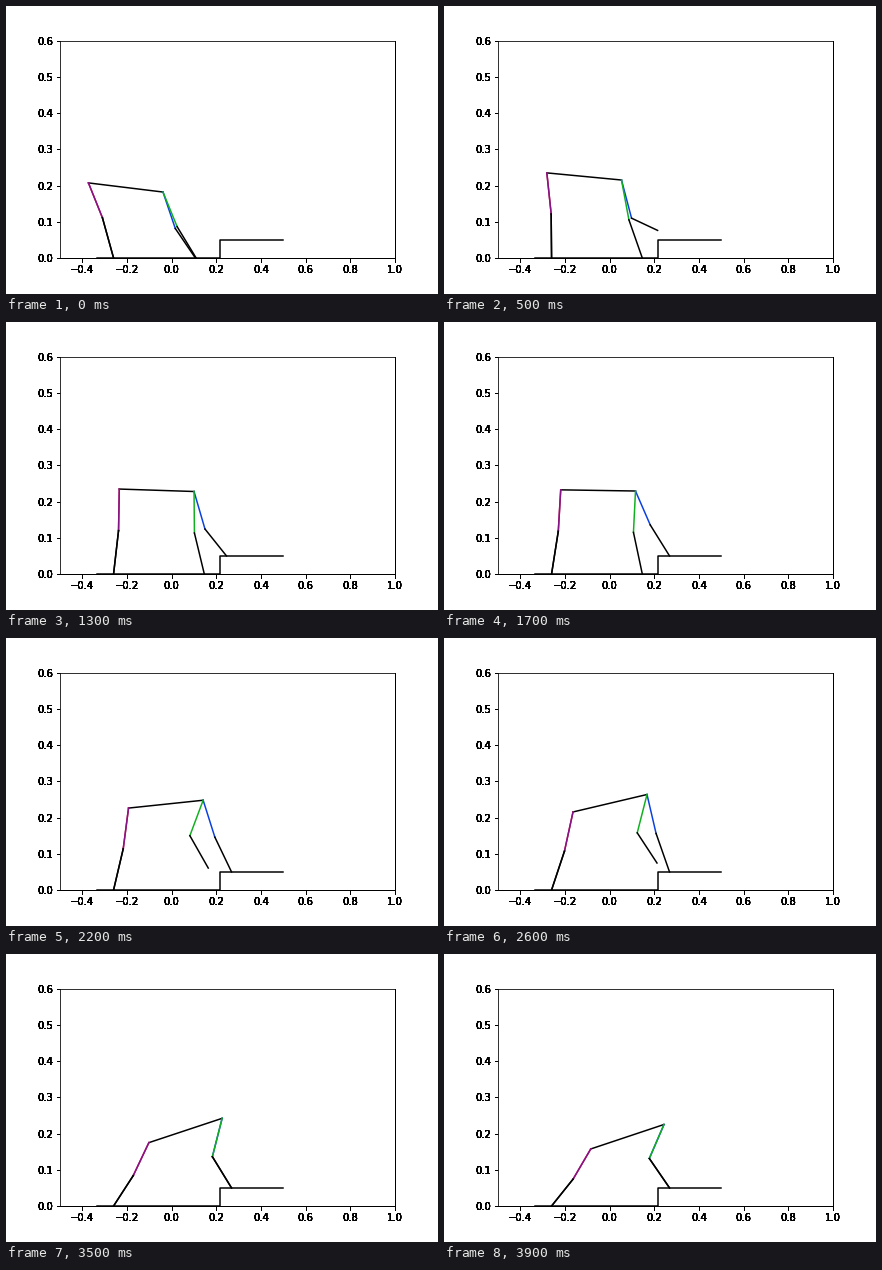
Write a matplotlib script that moves like this. It is 432 px wide and 288 px high and loops after 4 s.

```python
import numpy as np
import matplotlib.pyplot as plt
from matplotlib.animation import FuncAnimation

FRAMES, STEP_MS = 40, 100
BODY, REACH = 0.335, 0.2358
THIGH, SHIN = 0.1145, 0.1215
STEP_X, STEP_Y, LIFT = 0.2168, 0.05, 0.0486
HIND_FOOT = np.array([-0.26, 0.0])

# Front hip way-points: time, x, y
HIP_KEYS = np.array([
    (0, -.0385, .182), (.5, .0533, .2152), (.9, .0824, .2263),
    (1.7, .116, .229), (2.6, .1676, .2635), (2.8, .184, .2685),
    (3.1, .2056, .258), (3.9, .2437, .2249)])


def spline(t, keys):
    """Cubic Hermite curve with slopes taken from the neighbours."""
    times, pts = keys[:, 0], keys[:, 1:]
    slopes = np.gradient(pts, times, axis=0)
    i = min(np.searchsorted(times, t, side="right") - 1, len(times) - 2)
    h = times[i + 1] - times[i]
    u = (t - times[i]) / h
    ease = u * u * (3 - 2 * u)
    return (pts[i] + ease * (pts[i + 1] - pts[i])
            + h * u * (1 - u) * ((1 - u) * slopes[i] - u * slopes[i + 1]))


def progress(t, start, end):
    return np.clip((t - start) / (end - start), 0, 1)


def slide(t, start, end):
    u = progress(t, start, end)
    return u * u * (3 - 2 * u)


def ease_out(u):
    return np.sin(np.pi / 2 * u)


def ease_in(u):
    return 1 - np.cos(np.pi / 2 * u)


def swing(u, x0, x1, ease):
    """Foot arc from the floor up onto the step."""
    return np.array([x0 + (x1 - x0) * ease(u),
                     STEP_Y * u + LIFT * np.sin(np.pi * u)])


def blue_foot(t):
    foot = swing(progress(t, 0, 0.85), 0.1065, 0.2425, ease_out)
    return foot + [0.0259 * slide(t, 1.2, 1.65), 0]


def green_foot(t):
    x0 = 0.110 + 0.0365 * slide(t, 0, 0.4)
    return swing(progress(t, 1.8, 2.95), x0, 0.2684, ease_in)


def joint(p, q, a, b, side):
    """Point at distance a from p and b from q, on the chosen side."""
    dist = np.hypot(*(q - p))
    scale = max(1, 1.003 * dist / (a + b))
    a, b = a * scale, b * scale
    along = (a * a - b * b + dist * dist) / (2 * dist)
    bend = side * np.sqrt(max(a * a - along * along, 0))
    ux, uy = (q - p) / dist
    return p + along * np.array([ux, uy]) + bend * np.array([-uy, ux])


fig = plt.figure(figsize=(6, 4), dpi=72, facecolor="white")

# Stacked opaque axes give the labels their heavy look
for _ in range(10):
    ax = fig.add_axes([0.125, 0.125, 0.775, 0.755])
    ax.set(xlim=(-0.5, 1), ylim=(0, 0.6))
    ax.tick_params(labelsize=10)

ax.plot([-0.335, STEP_X, STEP_X, 0.5], [0, 0, STEP_Y, STEP_Y], "k", lw=1.5)


def segment(color):
    return ax.plot([], [], color=color, lw=1.5)[0]


body = segment("black")
legs = [(segment(c), segment("black"))
        for c in ("#c81048", "#861486", "#0a40e0", "#10b020")]


def link(line, p, q):
    line.set_data([p[0], q[0]], [p[1], q[1]])


def draw(i):
    t = i * STEP_MS / 1000
    front = spline(t, HIP_KEYS)
    hind = joint(front, HIND_FOOT, BODY, REACH, -1)
    link(body, hind, front)
    poses = [(hind, HIND_FOOT, 1), (hind, HIND_FOOT, 1),
             (front, blue_foot(t), -1), (front, green_foot(t), -1)]
    for (thigh, shin), (hip, foot, side) in zip(legs, poses):
        knee = joint(hip, foot, THIGH, SHIN, side)
        link(thigh, hip, knee)
        link(shin, knee, foot)
    return [body] + [line for leg in legs for line in leg]


anim = FuncAnimation(fig, draw, frames=FRAMES, interval=STEP_MS,
                     repeat=True, blit=False)
plt.show()
```
